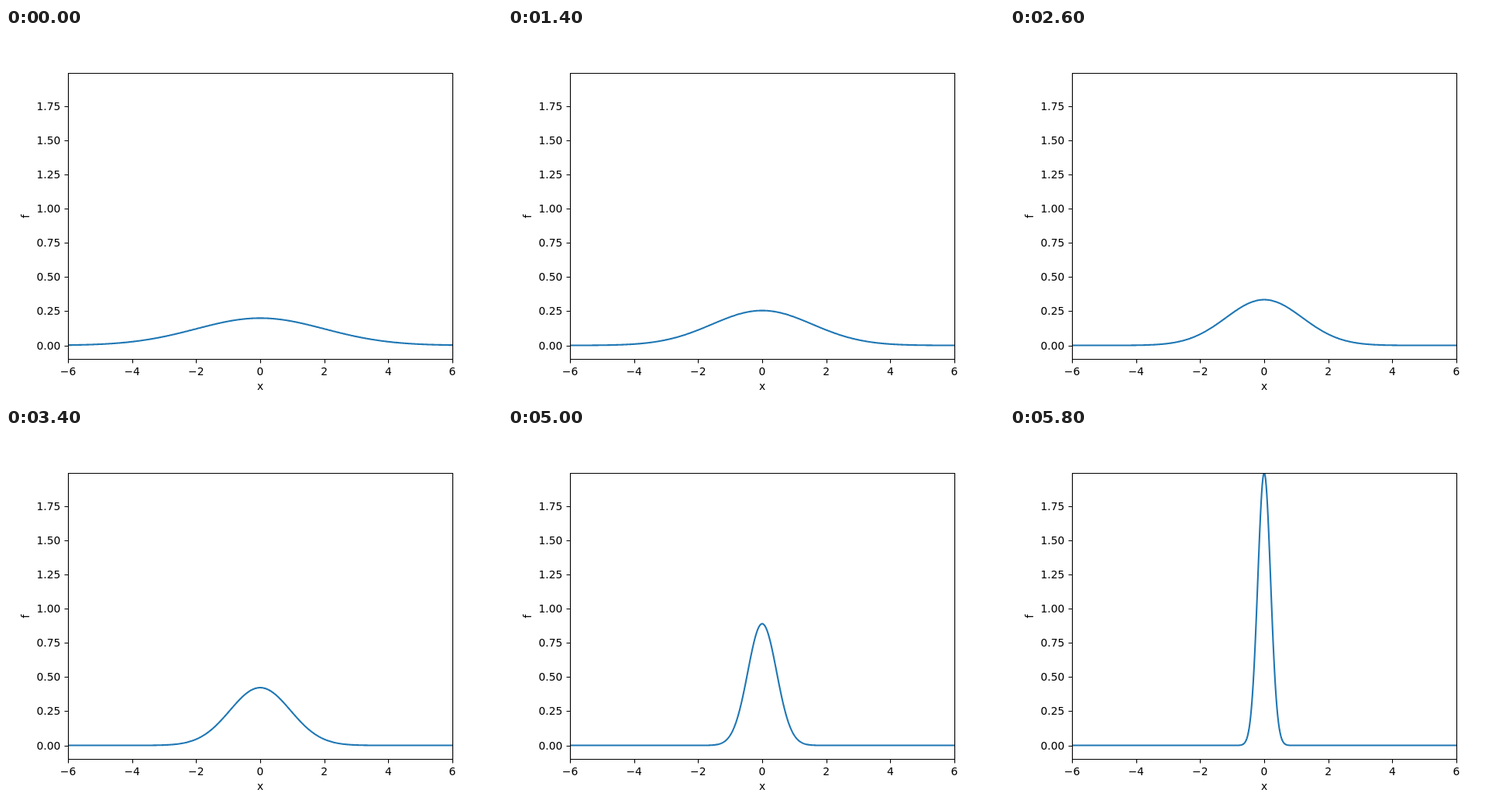
An HTML page for the animation above (6 s loop, 640 px wide and 480 px high).

```html
<!DOCTYPE html>
<html lang="en">
<head>
<meta charset="utf-8">
<title>Narrowing bell curve</title>
<style>
  html, body { margin: 0; width: 100%; height: 100%; overflow: hidden; background: #fff; }
  svg { display: block; }
  text { font: 13.889px "DejaVu Sans", sans-serif; text-anchor: middle; }
  .y { text-anchor: end; }
  path { fill: none; stroke: #000; stroke-width: 1.111; }
  #curve { stroke: #1f77b4; stroke-width: 2.083; stroke-linejoin: round; }
</style>
</head>
<body>
<svg width="640" height="480" viewBox="0 0 640 480">
  <clipPath id="plot"><rect x="80" y="58" width="496" height="369"/></clipPath>
  <g clip-path="url(#plot)"><path id="curve"/></g>
  <path id="axes"/>
  <g id="labels">
    <text x="328" y="467">x</text>
    <text transform="translate(30 243) rotate(-90)">f</text>
  </g>
</svg>
<script>
const STEPS = 30, STEP_MS = 200;
const gauss = (x, s) => Math.exp(-x * x / (2 * s * s)) / (s * Math.sqrt(2 * Math.PI));
const yMin = -0.1, yMax = gauss(0, 0.2);
const px = x => 80 + (x + 6) * 496 / 12;
const py = y => 427.2 - (y - yMin) * 369.6 / (yMax - yMin);
const $ = id => document.getElementById(id);

function addLabel(x, y, str, cls = "") {
  const t = document.createElementNS("http://www.w3.org/2000/svg", "text");
  t.setAttribute("x", x);
  t.setAttribute("y", y);
  t.setAttribute("class", cls);
  t.textContent = str;
  $("labels").append(t);
}

let axes = "M80.5 58.5H576.5V427.5H80.5Z";
for (let x = -6; x <= 6; x += 2) {
  axes += `M${Math.round(px(x)) + 0.5} 427.5v5`;
  addLabel(px(x), 448, String(x).replace("-", "\u2212"));
}
for (let y = 0; y <= 1.75; y += 0.25) {
  axes += `M80.5 ${Math.round(py(y)) + 0.5}h-5`;
  addLabel(70.3, Math.round(py(y) + 5), y.toFixed(2), "y");
}
$("axes").setAttribute("d", axes);

let shown = -1;
function draw() {
  const step = Math.floor(performance.now() / STEP_MS) % STEPS;
  if (step !== shown) {
    shown = step;
    const sigma = 2 - 1.8 * step / (STEPS - 1);
    const points = [];
    for (let i = 0; i <= 600; i++) {
      const x = -6 + i / 50;
      points.push(px(x).toFixed(2) + " " + py(gauss(x, sigma)).toFixed(2));
    }
    $("curve").setAttribute("d", "M" + points.join("L"));
  }
  requestAnimationFrame(draw);
}
draw();
</script>
</body>
</html>
```
